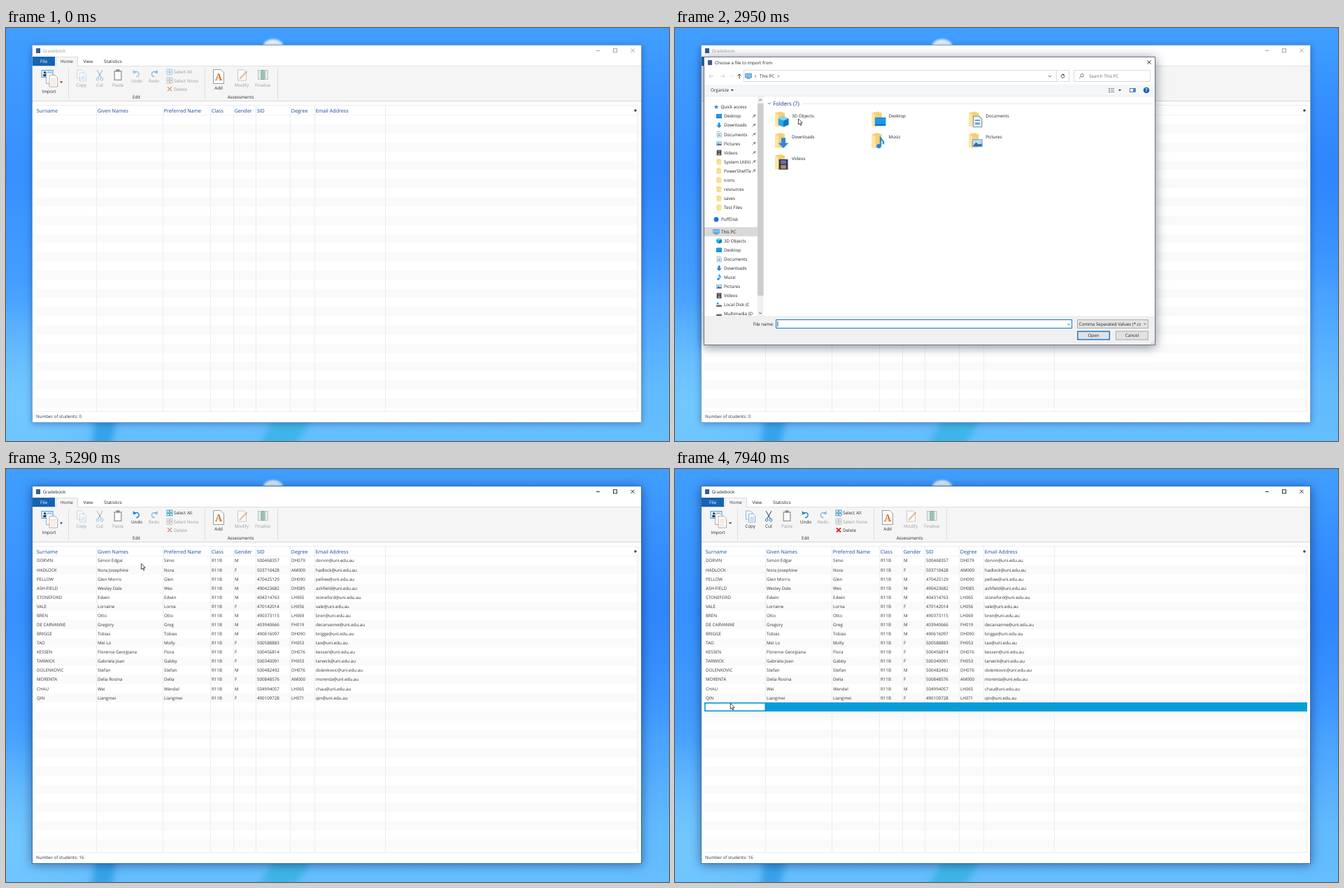
An HTML page with a canvas for the animation above (8 s loop, 948 by 591 pixels).

```html
<!DOCTYPE html>
<html lang="en">
<head>
<meta charset="utf-8">
<title>Class roll import</title>
<style>
html, body { margin: 0; width: 100%; height: 100%; overflow: hidden; background: #3f9eff; }
canvas { display: block; width: 100%; height: 100%; }
</style>
</head>
<body>
<canvas id="stage" width="948" height="591"></canvas>
<script>
const W = 948, H = 591, LOOP = 8000;
const stage = document.getElementById('stage').getContext('2d');
const layer = () => Object.assign(document.createElement('canvas'), { width: W, height: H }).getContext('2d');
const wall = layer(), panel = layer();
let c = stage;

// ---- drawing helpers ----
function R(x, y, w, h, col) { c.fillStyle = col; c.fillRect(x, y, w, h); }
function box(x, y, w, h, fill, edge, lw = 1) {
  if (fill) R(x, y, w, h, fill);
  c.strokeStyle = edge; c.lineWidth = lw;
  c.strokeRect(x + lw / 2, y + lw / 2, w - lw, h - lw);
}
function trace(pts) { c.beginPath(); pts.forEach(p => c.lineTo(p[0], p[1])); }
function line(pts, col, lw = 1) { trace(pts); c.strokeStyle = col; c.lineWidth = lw; c.stroke(); }
function poly(pts, fill, edge) {
  trace(pts); c.closePath();
  c.fillStyle = fill; c.fill();
  if (edge) { c.strokeStyle = edge; c.lineWidth = .8; c.stroke(); }
}
function disc(x, y, r, fill, edge) {
  c.beginPath(); c.arc(x, y, r, 0, 7);
  if (fill) { c.fillStyle = fill; c.fill(); }
  if (edge) { c.strokeStyle = edge; c.lineWidth = 1; c.stroke(); }
}
function T(s, x, y, col = '#222', size = 6.25, align = 'left', weight = 400) {
  c.font = `${weight} ${size}px "Open Sans", "Noto Sans", sans-serif`;
  c.textRendering = 'geometricPrecision';
  c.textAlign = align; c.fillStyle = col;
  c.fillText(s, x, y + size * .36);
}
function clip(x, y, w, h, fn) { c.save(); c.beginPath(); c.rect(x, y, w, h); c.clip(); fn(); c.restore(); }
function dim(on, fn, a = .42) { c.save(); if (!on) c.globalAlpha *= a; fn(); c.restore(); }
function right(x, y, col, r = 1.5) { line([[x - r / 2, y - r], [x + r / 2, y], [x - r / 2, y + r]], col, .8); }
function down(x, y, col, r = 2) { line([[x - r, y - r / 2], [x, y + r / 2], [x + r, y - r / 2]], col, .8); }
function up(x, y, col, r = 2) { line([[x - r, y + r / 2], [x, y - r / 2], [x + r, y + r / 2]], col, .8); }
function caretDown(x, y) { poly([[x - 2, y - 1], [x + 2, y - 1], [x, y + 1.2]], '#222'); }
function cross(x, y, r, col, lw) {
  line([[x - r, y - r], [x + r, y + r]], col, lw);
  line([[x - r, y + r], [x + r, y - r]], col, lw);
}
function page(x, y, w, h, col) {
  poly([[x, y], [x + w * .7, y], [x + w, y + w * .3], [x + w, y + h], [x, y + h]], '#fff', col);
}
function arrow(x, y, dir, col) {
  line([[x - 3 * dir, y], [x + 3 * dir, y]], col, .9);
  line([[x + .5 * dir, y - 2.5], [x + 3 * dir, y], [x + .5 * dir, y + 2.5]], col, .9);
}

// ---- small icons, about 8 units wide ----
const G = {
  folder() { R(-3.5, -4, 6, 8, '#f1cb66'); R(-2.5, -3, 6, 7, '#ffe08c'); },
  desk() { R(-4.2, -3.2, 8.4, 6.4, '#0b6fc4'); R(-4, -3, 8, 5, '#1b98f2'); },
  down() { poly([[-1.6, -4], [1.6, -4], [1.6, 0], [4, 0], [0, 4], [-4, 0], [-1.6, 0]], '#2f86dd'); },
  doc() { page(-3, -4, 6.5, 8, '#8fa3b5'); R(-1.8, -1.5, 4, 1, '#4a96d2'); R(-1.8, .5, 4, 2, '#6fb0de'); },
  pic() { box(-4, -3, 8, 6, '#b4dcf7', '#8ea2b4', .6); poly([[-3.5, 2.5], [-1, -.5], [1, 1], [3.5, .5], [3.5, 2.5]], '#2f6ea5'); },
  film() { R(-3.5, -4, 7, 8, '#363b50'); R(-2, -3.2, 4, 2.8, '#6b6fa8'); R(-2, .5, 4, 2.8, '#b88a55'); },
  cube() { poly([[0, -4], [4, -2.4], [4, 2.4], [0, 4], [-4, 2.4], [-4, -2.4]], '#2aa9e0'); poly([[0, -.5], [4, -2.4], [4, 2.4], [0, 4]], '#1479c0'); poly([[0, -4], [4, -2.4], [0, -.8], [-4, -2.4]], '#7fd6f5'); },
  note() { disc(-1.2, 2.4, 1.7, '#1c8ae0'); line([[.1, 2.4], [.1, -4], [2.6, -.6], [2, 1]], '#1c8ae0', 1.1); },
  pc() { R(-4.5, -3.6, 9, 6.2, '#2b78b8'); R(-4, -3.1, 8, 5, '#73c3f6'); R(-2.2, 3, 4.4, 1, '#607080'); },
  cloud() { disc(0, 0, 3.4, '#1478d4'); },
  star() { poly([...Array(10)].map((_, i) => { const r = i % 2 ? 1.6 : 4, a = i * Math.PI / 5; return [r * Math.sin(a), -r * Math.cos(a)]; }), '#2f8be0'); },
  disk() { R(-4, -.5, 8, 1.3, '#c9cdd2'); R(-4, .8, 8, 1.9, '#4b4f55'); },
  sys() { G.disk(); R(-3.6, -3.4, 3, 2.6, '#19a5ec'); },
  sheet() { R(-3.8, -3.8, 7.6, 7.6, '#22804c'); }
};
function glyph(k, x, y, s = 1) { c.save(); c.translate(x, y); c.scale(s, s); G[k](); c.restore(); }

// ---- desktop ----
function paintWall() {
  c = wall;
  const g = c.createLinearGradient(0, 0, 0, H);
  [[0, '#409eff'], [.35, '#3690ff'], [.6, '#439dff'], [.86, '#61b9ff'], [1, '#65beff']].forEach(s => g.addColorStop(...s));
  R(0, 0, W, H, g);
  const glow = (x, y, r, rgb) => {
    const q = c.createRadialGradient(x, y, 0, x, y, r);
    q.addColorStop(0, `rgba(${rgb},.75)`); q.addColorStop(1, `rgba(${rgb},0)`);
    R(x - r, y - r, 2 * r, 2 * r, q);
  };
  glow(20, 540, 150, '120,204,255');
  glow(948, 200, 180, '45,130,250');
  c.filter = 'blur(5px)';
  poly([[122, 600], [150, 600], [160, 555], [128, 555]], '#36a2ea');
  poly([[360, 600], [412, 600], [440, 555], [385, 555]], '#3fb4e8');
  c.filter = 'blur(1.5px)';
  c.beginPath(); c.ellipse(382, 25, 14, 9, 0, 0, 7); c.fillStyle = '#e6f2fb'; c.fill();
  c.filter = 'none';
  c = stage;
}
function shadow(x, y, w, h, blur, a) {
  c.save(); c.shadowColor = `rgba(0,20,60,${a})`; c.shadowBlur = blur; c.shadowOffsetY = 2;
  R(x, y, w, h, '#fff'); c.restore();
}

// ---- main window ----
const COLS = [42, 129, 224, 292, 325, 357, 406, 441, 542];
const HEADS = ['Surname', 'Given Names', 'Preferred Name', 'Class', 'Gender', 'SID', 'Degree', 'Email Address'];
const ROLL = `DORVIN|Simon Edgar|Simo|M|500468357|DH079
HADLOCK|Nora Josephine|Nora|F|503710428|AM000
PELLOW|Glen Morris|Glen|M|470425129|DH090
ASH-FIELD|Wesley Dale|Wes|M|490423682|DH085
STONEFORD|Edwin|Edwin|M|404314763|LH065
VALE|Lorraine|Lorna|F|470142014|LH056
BREN|Otto|Otto|M|490373115|LH069
DE CARVANNE|Gregory|Greg|M|403940666|FH019
BRIGGE|Tobias|Tobias|M|490616097|DH090
TAO|Mei Lo|Molly|F|500588883|FH053
KESSEN|Florence Georgiana|Flora|F|500456814|DH076
TARWICK|Gabriela Joan|Gabby|F|500340091|FH053
DOLENKOVIC|Stefan|Stefan|M|500482492|DH076
MORENTA|Delia Rosina|Delia|F|500848576|AM000
CHAU|Wei|Wendel|M|504994057|LH065
QIN|Liangmei|Liangmei|F|490109728|LH071`.split('\n').map(r => {
  const [last, first, pref, sex, sid, deg] = r.split('|');
  return [last, first, pref, 'R11B', sex, sid, deg, last.toLowerCase().replace(/[^a-z]/g, '') + '@uni.edu.au'];
});

function turn(x, y, dir) {
  c.save(); c.translate(x, y); c.scale(dir, 1);
  c.beginPath(); c.arc(0, 1, 3.6, -2.2, 1.7);
  c.strokeStyle = '#2382cf'; c.lineWidth = 1.5; c.stroke();
  poly([[-5, -5], [-4.6, .6], [.2, -1.6]], '#2382cf');
  c.restore();
}
function grid(x, y, col) {
  for (let i = 0; i < 4; i++) box(x + (i % 2) * 4.6, y + (i >> 1) * 4.6, 4.2, 4.2, '#eef6fb', col, .9);
}
function ribbon(t) {
  const loaded = t >= 5250, sel = t >= 7220, grey = '#9b9b9b', ink = '#2a2a2a';
  const label = (s, x, y, on) => T(s, x, y, on ? ink : grey, 6.25, 'center');
  R(38, 54, 870, 51, '#f5f5f5');
  R(38, 54, 870, 1, '#dedede'); R(38, 104, 870, 1, '#d6d6d6');
  R(38, 41, 32, 13, '#1564b2'); T('File', 54, 48, '#fff', 6.25, 'center');
  box(71, 41, 32, 14, '#f5f5f5', '#d9d9d9'); R(72, 54, 30, 1, '#f5f5f5');
  T('Home', 78, 48, '#352a4c'); T('View', 110.5, 48); T('Statistics', 140, 48);
  [89, 284, 388].forEach(x => R(x, 57, 1, 45, '#dedede'));

  const hot = t >= 700 && t < 2250;
  if (hot) box(44, 56, 42, 44, t >= 1830 && t < 1930 ? '#c3def4' : '#deecf8', '#a3cdec');
  box(50.5, 60, 17, 11, '#e6f3fc', '#4b9fd8');
  disc(55.5, 63.7, 1.6, '#24405e'); R(53.3, 66, 4.4, 3.2, '#24405e'); R(60, 62.5, 5, 1, '#7fbbe4');
  page(57.5, 64, 10.5, 15.5, '#8b9aa8'); page(62, 67.5, 11.5, 16.5, '#a29a92');
  for (let i = 0; i < 5; i++) R(64, 72 + i * 2.2, 7.2, .7, '#e3c5ae');
  caretDown(79, 77.5); label('Import', 61.5, 91, true);

  dim(sel, () => {
    page(101.5, 60, 9, 12, '#6f9cc4'); page(105.5, 64, 9, 12, '#6f9cc4');
    for (let i = 0; i < 3; i++) R(107, 69 + i * 2, 6, .8, '#7db4e2');
    line([[130, 60], [136.3, 71]], '#4c6784', 1.2); line([[138, 60], [131.7, 71]], '#4c6784', 1.2);
    disc(131, 73, 1.9, null, '#2384cf'); disc(137, 73, 1.9, null, '#2384cf');
  });
  dim(false, () => {
    box(154.5, 61, 11, 14, '#fff', '#5e5e5e', 1.3); R(157.5, 59, 5, 3.4, '#6b6b6b');
  }, .65);
  dim(loaded, () => turn(186.5, 65, 1)); dim(false, () => turn(212, 65, -1), .5);
  label('Copy', 107.5, 82, sel); label('Cut', 134, 82, sel); label('Paste', 160, 82);
  label('Undo', 187, 76, loaded); label('Redo', 211.5, 76);
  dim(loaded, () => grid(229.5, 58.5, '#3a93cc'));
  dim(false, () => grid(229.5, 70.8, '#8d8d8d'), .5);
  if (sel) cross(234, 87.3, 3, '#d8142a', 1.7);
  else cross(234, 87.3, 3, loaded ? '#d99a94' : '#eda06c', 1.6);
  T('Select All', 240, 63, loaded ? ink : grey, 6.3);
  T('Select None', 240, 75.3, grey, 6.3);
  T('Delete', 240, 87.3, sel ? ink : grey, 6.3);
  label('Edit', 186.5, 99, true);

  page(296.5, 59.5, 15, 20, '#7d8590');
  c.font = 'bold 14px "Noto Serif", "Liberation Serif", serif';
  c.textAlign = 'center'; c.fillStyle = '#dc7426'; c.fillText('A', 304, 74.5);
  label('Add', 304, 86, true);
  dim(false, () => {
    page(331.5, 60, 12, 15, '#888'); line([[334, 73], [344.5, 62]], '#d98b3a', 2.2);
    box(360, 60, 4.5, 14, '#dfe7ee', '#7b8b99', .8); box(365, 60, 4.5, 14, '#4fae7b', '#4c8a68', .8);
    box(370, 60, 4.5, 14, '#dfe7ee', '#7b8b99', .8);
  }, .55);
  label('Modify', 337, 82); label('Finalise', 367, 82);
  label('Assessments', 335.5, 99, true);
}
function table(t) {
  const loaded = t >= 5250, rowY = i => 131.2 + 13.08 * i;
  R(42, 110, 862, 1, '#e9edf2');
  for (let i = 1; i < 32; i += 2) R(42, rowY(i) - 6.5, 862, 13, '#fafafa');
  R(42, 124.3, 862, .8, '#eceff3');
  const rules = col => COLS.slice(1).concat(903).forEach(x => R(x, 111, 1, 437, col));
  rules('#e6eef6'); R(42, 548, 862, 1, '#eceef0');
  HEADS.forEach((s, i) => T(s, COLS[i] + 1.7, 118.2, '#17489c', 7.15));
  R(898, 117.4, 4, 1.1, '#222'); R(899.4, 116, 1.1, 4, '#222');
  if (loaded) ROLL.forEach((r, i) => r.forEach((s, j) => T(s, COLS[j] + 2, rowY(i), '#333', 6.2)));
  if (t >= 7220) {
    R(42, 334, 862, 13, '#069dd8');
    COLS.slice(1).forEach(x => R(x, 334, 1, 13, '#2f8fc0'));
    if (t >= 7440) {
      box(42, 334, 88, 13, '#fff', '#0696d0', 1.6);
      if (t < 7940) R(44.7, 336, .9, 9, '#222');
    }
  }
  T('Number of students: ' + (loaded ? 16 : 0), 43, 555.5, '#333', 6.2);
}
function mainWindow(t) {
  const active = t >= 1830 && t < 2600 || t >= 5150, ink = active ? '#1a1a1a' : '#999';
  shadow(37, 24, 872, 540, active ? 14 : 9, active ? .5 : .35);
  box(37, 24, 872, 541, '#fff', active ? '#3f73a8' : '#7ba3cc');
  R(43, 29, 6, 7, '#345c9c');
  T('Gradebook', 52.5, 32.7, active ? '#222' : '#8fa08f', 6.3);
  R(844, 32, 5, .9, ink); box(868, 29.3, 6, 6, null, ink, .9); cross(896, 32.3, 2.6, ink, .9);
  ribbon(t); table(t);
}

// ---- file dialog ----
function paneIcon(x, y) { box(x - 4, y - 3, 8.5, 6, '#fff', '#555', .8); R(x + 1, y - 3, 3.5, 6, '#3b8ad0'); }
function help(x, y) { disc(x, y, 4.3, '#1168bd'); T('?', x, y, '#fff', 6.5, 'center', 700); }
function button(s, x, y, main) {
  box(x, y, 47, 13, '#e1e1e1', main ? '#1078d0' : '#adadad', main ? 1.4 : 1);
  T(s, x + 23.5, y + 6.3, '#222', 6.25, 'center');
}
function combo(x, y) {
  box(x, y, 102, 13, '#e3e3e3', '#adadad');
  clip(x, y, 91, 13, () => T('Comma Separated Values (*.csv)', x + 2.5, y + 6.5));
  down(x + 97, y + 6.5, '#444', 1.8);
}
function titleBar(x, y, w) {
  R(x, y, w, 17, '#fff'); R(x + 6, y + 5, 6, 7, '#345c9c');
  T('Choose a file to import from', x + 16, y + 8.3);
  cross(x + w - 9, y + 8, 2.7, '#222', .9);
}
function scroller(x, y, end, thumb) {
  R(x, y, 8.5, end - y, '#f0f0f0'); R(x, y + 10, 8.5, thumb - y - 10, '#cdcdcd');
  up(x + 4, y + 5, '#444'); down(x + 4, end - 4, '#444');
}
function loading() {
  R(44, 43, 635, 406, '#f0f0f0');
  titleBar(44, 43, 635);
  R(44, 59, 347, 40, '#f6f7f8'); R(44, 99, 347, 235, '#fff');
  R(119, 99, 8, 308, '#f0f0f0'); R(119, 108, 8, 272, '#cbcbcb');
  up(123, 103.5, '#444'); down(123, 404, '#444');
  R(44, 141, 75, 13.5, '#d9d9d9'); glyph('pc', 61, 148);
  ['Quick access', 'PuffDisk', 'This PC', 'Network'].forEach((s, i) => T(s, 68, 114 + i * 17.1));
  T('Working on it...', 260, 111, '#555', 6.25, 'center');
  [68, 90].forEach(y => { paneIcon(360, y); help(379, y); });
  R(154, 318, 26, 8, '#f0f0f0'); T('File name:', 208.5, 322, '#222', 6.25, 'right');
  box(213, 315, 57, 12.5, '#fff', '#1078d0'); R(215, 317, .9, 8, '#222'); down(265, 321.5, '#444', 1.8);
  R(213, 332, 57, 2, '#d4d4d4');
  button('Open', 291, 315, true); button('Cancel', 341, 315);
  R(145, 413, 417, 13, '#fff'); combo(568, 413);
  box(44, 43, 635, 406, null, '#8a8a8a');
}

const QUICK = 'desk:Desktop,down:Downloads,doc:Documents,pic:Pictures,film:Videos,folder:System Utiliti,folder:PowerShellTe,folder:icons,folder:resources,folder:saves,folder:Test Files'.split(',');
const DISKS = 'cube:3D Objects,desk:Desktop,doc:Documents,down:Downloads,note:Music,pic:Pictures,film:Videos,sys:Local Disk (C:),disk:Multimedia (D:)'.split(',');

function tree(t) {
  const go = t >= 4070, ch = Math.min(1, Math.max(0, (t - 3850) / 80));
  const entry = (e, y) => { const [k, s] = e.split(':'); glyph(k, 63, y, .95); T(s, 70, y); };
  clip(42, 98, 76, 314, () => {
    if (go) R(42, 250, 76, 13.2, '#cce8ff');
    else {
      if (t >= 3890) R(42, 250, 76, 13.2, '#e5f3ff');
      R(42, 285, 76, 13.2, '#d9d9d9');
    }
    glyph('star', 59, 113, .9); T('Quick access', 65.5, 113);
    QUICK.forEach((e, i) => {
      const y = 126.1 + 13.08 * i;
      entry(e, y);
      if (i < 7) { line([[110.5, y + 2.5], [113, y]], '#666', .7); line([[112, y - 1.5], [114.5, y + 1]], '#666', .9); line([[113, y], [114.8, y - 2]], '#666', 1.5); }
    });
    glyph('cloud', 59, 274); T('PuffDisk', 66, 274);
    glyph('pc', 59, 291.5); T('This PC', 66, 291.5);
    DISKS.forEach((e, i) => entry(e, 304.6 + 13.08 * i));
    dim(false, () => {
      down(47, 113, '#333'); right(47, 274, '#777', 2); down(47, 291.5, '#333');
      DISKS.forEach((_, i) => right(52, 304.6 + 13.08 * i, '#777', 2));
    }, ch);
  });
  scroller(118, 98, 412, 383);
}
function group(s, y, x) {
  down(135, y, '#555', 2.2); T(s, 140, y, '#1e3287', 7.8); R(x, y, 683 - x, 1, '#e6e6e6');
}
function drive(x, y) {
  poly([[x, y], [x + 8, y - 4], [x + 23, y + 1], [x + 14, y + 6]], '#d4d6d9');
  poly([[x, y], [x + 14, y + 6], [x + 14, y + 10], [x, y + 4]], '#5b5e63');
  poly([[x + 14, y + 6], [x + 23, y + 1], [x + 23, y + 5], [x + 14, y + 10]], '#2c2e31');
}
function gauge(x, fill, col) { box(x, 233, 103, 7.5, '#e6e6e6', '#bdbdbd', .8); R(x + .8, 233.8, fill, 5.9, col); }
function thisPc(t) {
  group('Folders (7)', 108, 182);
  const tiles = 'cube:3D Objects,desk:Desktop,doc:Documents,down:Downloads,note:Music,pic:Pictures,film:Videos'.split(',');
  tiles.forEach((e, i) => {
    const [k, s] = e.split(':'), x = 143 + (i % 3) * 138.6, y = 119.5 + (i / 3 | 0) * 30.6;
    poly([[x, y + 2], [x + 8, y], [x + 14, y + 2], [x + 14, y + 21], [x, y + 21]], '#f3d079');
    poly([[x, y + 2], [x + 5, y + 5], [x + 5, y + 23], [x, y + 20]], '#ffe6a3');
    glyph(k, x + 12, y + 14.5, 1.85);
    T(s, x + 24, y + 6);
  });
  if (t < 3080) return;
  group('Devices and drives (3)', 214.3, 222);
  drive(140, 239); R(140.5, 231, 8.5, 9, '#18a7ee');
  T('Local Disk (C:)', 167, 228); gauge(167, 83, '#26a0da'); T('43.1 GB free of 231 GB', 167, 244.7, '#6d6d6d', 6.1);
  drive(278.5, 239);
  T('Multimedia (D:)', 305.7, 228); gauge(305.3, 101, '#da2626'); T('1.70 GB free of 2.50 TB', 305.7, 244.7, '#6d6d6d', 6.1);
  drive(417, 239); disc(432, 234, 7, '#d5d8dc', '#9a9da2'); R(427, 233, 11, 9, '#1c1c1e');
  T('BD-RE Drive (F:)', 444, 231.6);
}
function files(t, cur) {
  [['Name', 138], ['Date modified', 280], ['Type', 358.5], ['Size', 424]].forEach(h => T(h[0], h[1], 104.5, '#4c607a'));
  [276, 355, 421, 464].forEach(x => R(x, 98, 1, 13, '#e5e5e5'));
  up(206, 99, '#777');
  if (t < 4200) return;
  const list = 'saves|14/12/2020 5:21 PM,PHIL1001.R11B.csv|14/12/2020 3:59 PM,PHIL1001.T17C.csv|26/11/2020 3:04 PM,PHIL1001.W15A.csv|26/11/2020 3:04 PM'.split(',');
  list.forEach((e, i) => {
    const [s, date] = e.split('|'), y = 120.4 + 11.45 * i, hot = cur[0] > 137 && cur[0] < 463 && Math.abs(cur[1] - y) < 5.7;
    const picked = i === 1 && t >= 4820;
    if (hot || picked) R(137, y - 5.6, 326, 11.3, picked ? '#cce8ff' : '#e5f3ff');
    glyph(i ? 'sheet' : 'folder', 143, y, .95);
    T(s, 149, y, '#222', 6.2); T(date, 280, y, '#6d6d6d', 6.1);
    T(i ? 'Quillmora Office E...' : 'File folder', 358.5, y, '#6d6d6d', 6.1);
    if (i) T('2 KB', 460, y, '#6d6d6d', 6.1, 'right');
  });
}
function dialog(t, cur) {
  const inDir = t >= 4110, focus = t < 4070, dark = '#333', pale = '#c4c4c4';
  R(41, 41, 646, 413, '#fff');
  titleBar(41, 41, 646);
  arrow(52, 69, -1, inDir ? dark : pale); arrow(68, 69, 1, pale); down(81, 69, inDir ? '#555' : pale, 1.5);
  line([[92, 72.5], [92, 66]], dark, .9); line([[89.4, 68.6], [92, 66], [94.6, 68.6]], dark, .9);
  box(98, 60, 466, 17, '#fff', '#dcdcdc'); R(545, 61, 1, 15, '#dcdcdc');
  glyph(inDir ? 'folder' : 'pc', 105, 68.6, 1.05); right(115, 69, '#444');
  let x = 121;
  (inDir ? 'This PC/Documents/NetBeansProjects/Gradebook/src/Test Files' : 'This PC').split('/').forEach(s => {
    T(s, x, 69); x += c.measureText(s).width + 5.7; right(x, 69, '#444'); x += 6.2;
  });
  down(536, 69, '#444');
  c.beginPath(); c.arc(554.5, 69, 2.4, -.6, 4.6); c.strokeStyle = dark; c.lineWidth = .8; c.stroke();
  poly([[554, 65.4], [557, 66.4], [554.6, 68.2]], dark);
  box(570, 60, 110, 17, '#fff', '#dcdcdc');
  disc(582, 67.8, 2.2, null, '#777'); line([[580.4, 69.5], [578, 72]], '#777', .9);
  T('Search ' + (inDir ? 'Test Files' : 'This PC'), 592, 69, '#6d6d6d');
  R(42, 81, 644, 16, '#f5f6f7'); R(42, 97, 644, 1, '#ebebeb');
  T('Organize', 51, 89, '#1e3250'); caretDown(81.8, 89);
  if (inDir) T('New folder', 100.5, 89, '#1e3250');
  for (let i = 0; i < 3; i++) { R(620, 86 + i * 2.5, 2, 1.3, '#4a86b8'); R(623, 86 + i * 2.5, 5, 1, '#888'); }
  caretDown(636, 89); paneIcon(654, 89); help(674, 89);
  tree(t);
  if (inDir) files(t, cur); else thisPc(t);
  R(42, 412, 644, 41, '#f0f0f0');
  T('File name:', 141.5, 424, '#222', 6.25, 'right');
  box(144, 417, 424, 13, '#fff', focus ? '#1078d0' : '#7a7a7a'); down(563, 424, '#444', 1.8);
  if (focus && (t - 2600) % 1060 < 530 || focus && t > 3600 && t < 3850) R(146.4, 419.5, .9, 8, '#222');
  if (t >= 4840) T('PHIL1001.R11B.csv', 147, 424);
  combo(575, 417);
  button('Open', 575, 433.5, true); button('Cancel', 630, 433.5);
  for (let i = 0; i < 3; i++) R(684 - i * 1.8, 451, 1, 1, '#aaa'), R(684, 451 - i * 1.8, 1, 1, '#aaa');
  box(41, 41, 646, 413, null, '#707478');
}
function showDialog(t, cur) {
  if (t < 2450 || t >= 5200) return;
  const early = t < 2700;
  let shrink = 0, alpha = 1;
  if (t < 2650) { const p = (t - 2450) / 200; shrink = (1 - p) ** 2 / .36; alpha = 1 - (1 - p) ** 3; }
  if (t > 5020) { const p = (t - 5020) / 180; shrink = p * 2; alpha = 1 - p; }
  c = panel; c.clearRect(0, 0, W, H);
  if (early) loading(); else dialog(t, cur);
  c = stage;
  const src = early ? [44, 43, 635, 406] : [41, 41, 646, 413];
  const dst = [41 + 3 * shrink, 41 + 2 * shrink, 646 - 11 * shrink, 413 - 7 * shrink];
  c.save();
  c.globalAlpha = alpha;
  // shadow only outside the panel, so the fade stays even
  c.save();
  c.beginPath(); c.rect(0, 0, W, H); c.rect(...dst); c.clip('evenodd');
  shadow(...dst, 14, .5);
  c.restore();
  c.drawImage(panel.canvas, ...src, ...dst);
  c.restore();
}

// ---- pointer ----
const PATH = [
  [0, 890, 596], [30, 886, 584], [300, 560, 330], [560, 140, 112], [770, 64, 81], [2100, 64, 81], [2110, 64, 80], [2250, 64, 80],
  [2530, 82, 92], [3040, 190, 140], [3350, 180, 195], [3670, 110, 248], [3850, 86, 255], [4100, 86, 255],
  [4300, 120, 215], [4580, 198, 147], [4720, 193, 135], [5600, 193, 135], [5720, 193, 136], [5860, 195, 137],
  [6000, 400, 129], [6150, 462, 230], [6330, 330, 372], [6500, 32, 368], [6640, 54, 352], [6800, 88, 353],
  [7080, 79, 339], [7220, 79, 338], [7400, 79, 335], [8000, 79, 335]
];
function slope(i, k) {
  const a = PATH[i - 1], b = PATH[i], d = PATH[i + 1];
  if (!a || !d || a[k] === b[k] || b[k] === d[k]) return 0;
  return (d[k] - a[k]) / (d[0] - a[0]);
}
function pointerAt(t) {
  let i = 0;
  while (i < PATH.length - 2 && t >= PATH[i + 1][0]) i++;
  const a = PATH[i], b = PATH[i + 1], d = b[0] - a[0], u = (t - a[0]) / d, v = 1 - u;
  return [1, 2].map(k => v * v * (1 + 2 * u) * a[k] + u * u * (1 + 2 * v) * b[k]
    + d * u * v * (v * slope(i, k) - u * slope(i + 1, k)));
}
function pointer(x, y) {
  c.save(); c.translate(x, y);
  poly([[.4, .4], [.4, 8.6], [2.3, 6.9], [3.6, 10], [4.9, 9.4], [3.6, 6.5], [6.2, 6.3]], '#fff', '#222');
  c.restore();
}
function tooltip() {
  c.save(); c.shadowColor = 'rgba(0,0,0,.4)'; c.shadowBlur = 4; c.shadowOffsetY = 1;
  c.beginPath(); c.roundRect(69, 84.5, 83.5, 15, 1.5); c.fillStyle = '#343434'; c.fill();
  c.restore();
  T('Import students from class roll', 73, 92, '#e4e4e4', 5.25);
}

function draw(t) {
  const cur = pointerAt(t);
  c.drawImage(wall.canvas, 0, 0);
  mainWindow(t);
  if (t >= 1230 && t < 1830) tooltip();
  showDialog(t, cur);
  if (t >= 30) pointer(...cur);
}
const start = performance.now();
function tick() {
  draw((performance.now() - start) % LOOP);
  requestAnimationFrame(tick);
}
paintWall();
tick();
</script>
</body>
</html>
```
